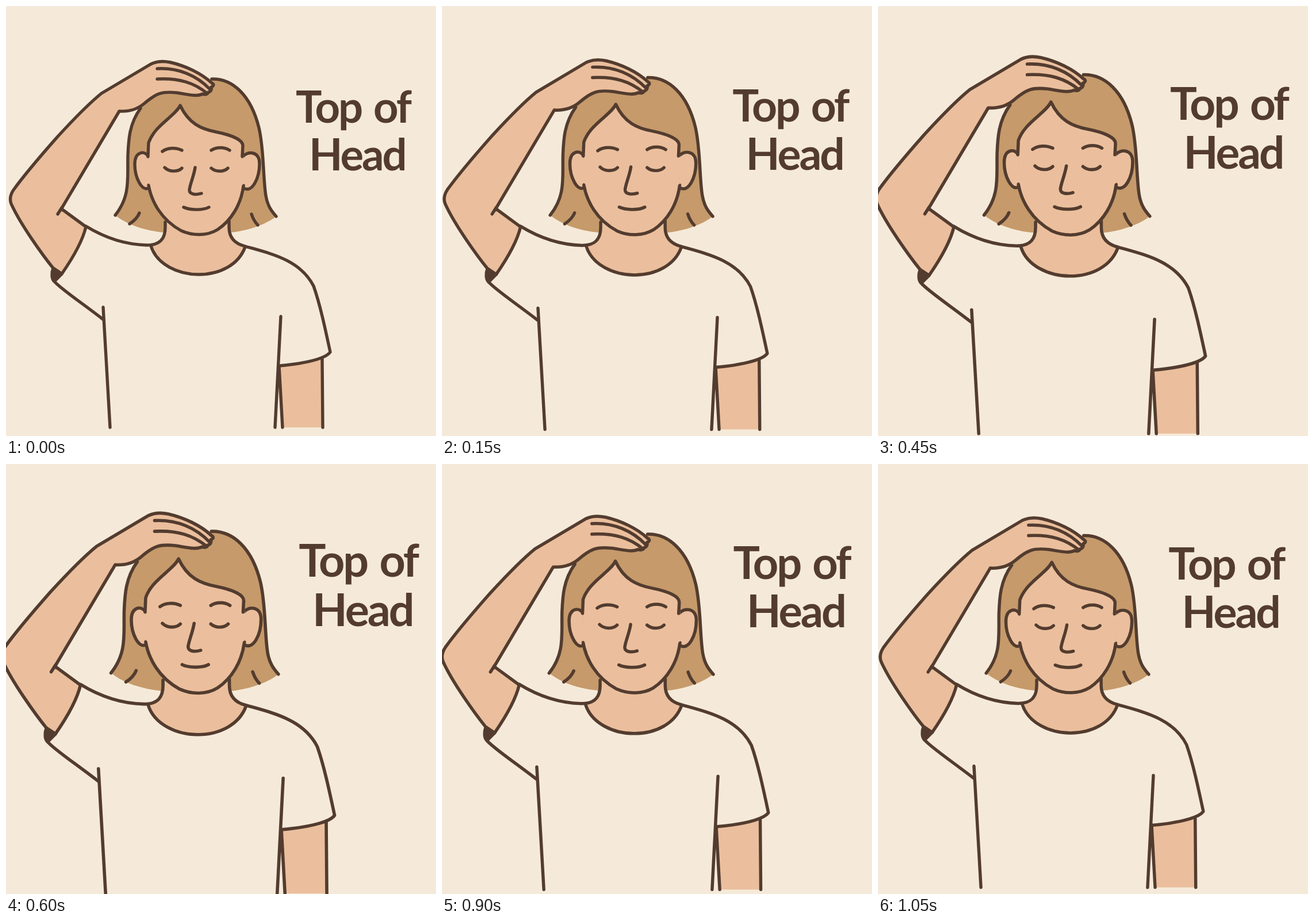
An HTML page without scripts that plays this animation: 748x748 px, repeating every 1200 ms.

```html
<!DOCTYPE html>
<html lang="en">
<head>
<meta charset="utf-8">
<title>Top of Head</title>
<style>
  :root { --bg: #f5ead9; --ink: #533c2f; --skin: #ebbf9d; --hair: #c69a6b; }
  html, body { margin: 0; width: 100%; height: 100%; overflow: hidden; background: var(--bg); }
  svg { display: block; width: 100%; height: 100%; }
  path { fill: none; stroke: var(--ink); stroke-width: 5.4; stroke-linecap: round; stroke-linejoin: round; }
  .skin { fill: var(--skin); }
  .hair { fill: var(--hair); }
  .cuff { fill: var(--ink); }
  .flat { stroke: none; }
  text { font: 700 76px Lato, "Open Sans", sans-serif; letter-spacing: -3px; fill: var(--ink); }

  /* the whole picture swells in hard steps and shrinks back */
  #scene { transform-origin: 374px 374px; animation: pulse 1.2s step-end infinite; }
  @keyframes pulse {
    0%, 100% { transform: scale(1); }
    12.5%, 87.5% { transform: scale(1.01); }
    25%, 75% { transform: scale(1.02); }
    37.5%, 62.5% { transform: scale(1.03); }
    50% { transform: scale(1.04); }
  }
</style>
</head>
<body>
<svg viewBox="0 0 748 748">
  <g id="scene">
    <!-- hair -->
    <path class="hair flat" d="M190 364C217 330 211 300 212 260C213 235 214 205 232 180L250 160L290 145L358 127C394 126 426 155 440 212C449 250 447 300 452 330C455 348 462 357 470 366C450 382 415 392 390 394H277C250 392 215 384 190 364Z"/>
    <path d="M190 364C217 330 211 300 212 260C213 235 214 205 234 178M358 127C394 126 426 155 440 212C449 250 447 300 452 330C455 348 462 357 470 366"/>
    <path d="M232 360C229 368 224 373 215 379M427 362C430 371 433 376 438 381"/>

    <!-- neck -->
    <path class="skin flat" d="M277 365V385C277 405 268 416 252 417C262 450 300 467 335 467C372 467 405 450 416 419C400 414 388 405 388 385V365Z"/>
    <path d="M252 417C262 450 300 467 335 467C372 467 405 450 416 419"/>

    <!-- face and ears -->
    <path class="skin" d="M248 262C240 250 224 254 224 275C224 300 237 322 247 317C251 315 250 312 249 311"/>
    <path class="skin" d="M412 262C420 252 441 252 441 274C441 300 428 325 414 317C412 316 412 314 413 312"/>
    <path class="skin flat" d="M248 312C253 340 270 372 305 391C325 400 350 400 368 389C392 373 409 345 413 313L414 262L412 243C412 232 390 224 365 219C340 214 318 205 303 173C294 192 258 208 248 238V262Z"/>
    <path d="M248 312C253 340 270 372 305 391C325 400 350 400 368 389C392 373 409 345 413 313"/>
    <path d="M247 262L248 238C258 208 294 192 303 173C318 205 340 214 365 219C390 224 412 232 412 243L411 262"/>
    <path d="M272 253C281 246 296 246 306 251M357 251C366 245 380 245 389 251"/>
    <path d="M276 281C284 289 299 289 306 282M357 282C365 289 379 289 386 282"/>
    <path d="M329 281C327 295 320 310 319 320C319 328 330 329 340 326"/>
    <path d="M309 350C319 355 342 356 353 350"/>

    <!-- raised arm -->
    <path class="skin" d="M95 355L197 183C215 184 228 180 240 170C262 151 272 148 298 151C318 154 332 158 342 153C347 155 351 153 352 150C357 149 358 144 357 141C362 139 362 136 358 134C340 117 312 104 286 98C272 95 262 96 252 101L166 152C140 173 113 202 90 227C68 252 36 288 13 320C7 329 6 336 9 344C25 380 65 435 82 456L97 466C115 440 133 410 139 384L98 354Z"/>
    <path d="M90 362L97 351M263 109C300 107 332 121 355 145M263 127C302 125 328 134 350 152"/>
    <path class="cuff" stroke-width="3" d="M82 456L97 466L84 479C79 475 79 464 82 456Z"/>

    <!-- shirt -->
    <path d="M139 383C170 402 205 415 245 416C268 416 277 405 277 385V376"/>
    <path d="M84 479C95 492 130 515 170 546M169 524L181 733"/>
    <path class="skin flat" d="M476 626C505 624 530 619 550 612L551 733H481Z"/>
    <path d="M388 374V385C388 405 400 414 416 418C462 431 512 442 535 487C546 518 555 560 564 602C560 608 550 612 540 615C520 621 498 624 474 626"/>
    <path d="M478 540L468 733M475 626L481 733M550 614L551 733"/>

    <text y="203"><tspan x="504">Top</tspan> <tspan x="639">of</tspan></text>
    <text x="527" y="286">Head</text>
  </g>
</svg>
</body>
</html>
```
